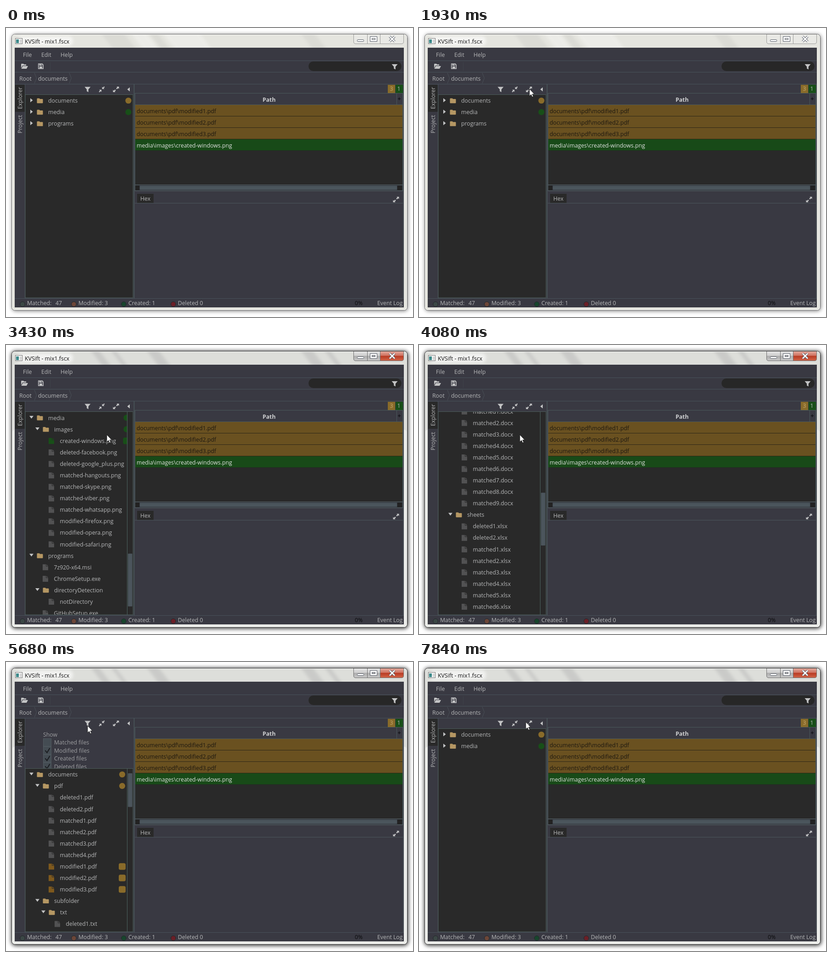
Write an HTML page that moves like this. It is 888 px wide and 631 px high and loops after 8000 ms.

```html
<!DOCTYPE html>
<html lang="en">
<head>
<meta charset="utf-8">
<title>KVSift</title>
<style>
html, body { margin: 0; width: 100%; height: 100%; overflow: hidden; background: #fff; }
svg { display: block; width: 888px; height: 631px; }
text { font: 12.3px "Open Sans", "Noto Sans", sans-serif; fill: #b6b7b8; white-space: pre; }
</style>
</head>
<body>
<svg id="stage" viewBox="0 0 888 631" xmlns="http://www.w3.org/2000/svg"></svg>
<script>
const LOOP = 8000, ROW = 25.08, TOP = 145.5, BOTTOM = 589, PANEL = 176, NOTCH = 128.15;
const C = {
  pane: '#393942', dark: '#292929', line: '#4a585b', thumb: '#4b555c', icon: '#c3c4c5',
  folder: '#b59763', file: '#525253', mod: '#896b2a', modFile: '#7e591d', new: '#184f18'
};

const R = (x, y, w, h, fill, more = '') =>
  `<rect x="${x}" y="${y}" width="${w}" height="${h}" fill="${fill}" ${more}/>`;
const T = (x, y, s, more = '') => `<text x="${x}" y="${y}" ${more}>${s}</text>`;
const P = (d, fill, more = '') => `<path d="${d}" fill="${fill}" ${more}/>`;
const L = (d, stroke = C.line, w = 1, more = '') => P(d, 'none', `stroke="${stroke}" stroke-width="${w}" ${more}`);
const dot = (x, y, r, fill, more = '') => `<circle cx="${x}" cy="${y}" r="${r}" fill="${fill}" ${more}/>`;
const at = (x, y, body, more = '') => `<g transform="translate(${x} ${y})${more}">${body}</g>`;

// Icons, centred on their own origin
const funnel = P('M-6.5-5.5H6.5L1.8 0V6L-1.8 4V0Z', C.icon);
const outward = P('M1.5-6H6.5V-1L4.8-2.7 2-.2.2-2 2.7-4.3ZM-1.5 6H-6.5V1L-4.8 2.7-2 .2-.2 2-2.7 4.3Z', C.icon);
const inward = P('M.7-.7V-5.7L2.4-4 5-6.5 6.5-5 4-2.4 5.7-.7ZM-.7.7V5.7L-2.4 4-5 6.5-6.5 5-4 2.4-5.7.7Z', C.icon);
const folder = P('M-6.5-4.2Q-6.5-5.5-5.2-5.5H-1.5Q-.5-5.5 0-4H5.3Q6.5-4 6.5-2.8V4Q6.5 5.2 5.3 5.2H-5.3Q-6.5 5.2-6.5 4Z', C.folder);
const fileIcon = fill => P('M-6-6.5H1V-1.8H6V6.5H-6ZM2-6.5L6-2.8H2Z', fill);

function streaks(list, fill, opacity) {
  return list.map(([x, w]) => P(`M${x} 8h${w}l32 42h${-w}Z`, fill, `opacity="${opacity}" filter="url(#soft)"`)).join('');
}

function frame(active) {
  const shadow = active
    ? 'drop-shadow(1px 1px 4px rgba(0,0,0,.6)) drop-shadow(0 1px 5px rgba(0,0,0,.45))'
    : 'drop-shadow(1px 1px 4px rgba(0,0,0,.5))';
  const glass = active
    ? streaks([[182, 18], [226, 10], [304, 26], [640, 26], [692, 12]], '#b4b4b4', .45)
    : streaks([[205, 50], [310, 18], [640, 30]], '#c9c9c4', .35) + streaks([[270, 34], [340, 80]], '#fff', .3);
  const x = 'M-5.5-5.5L5.5 5.5M5.5-5.5L-5.5 5.5';
  const edge = active ? '#6d6d6d' : '#9c9c9a';
  return `<g style="filter:${shadow}">${R(12.5, 13.5, 863, 603, active ? '#dddeda' : '#e5e5df', `rx="7" stroke="${active ? '#303030' : '#666'}"`)}</g>`
    + `<g clip-path="url(#title)">${glass}</g>`
    + (active ? R(14, 185, 860, 430, '#fff', 'rx="5" opacity=".4"') : '')
    + R(13.5, 14.5, 861, 601, 'none', 'rx="6" stroke="#fff" stroke-opacity=".75"')
    + R(24, 18, 122, 21, '#fff', 'rx="9" opacity=".6" filter="url(#soft)"')
    + P('M758.5 14V30Q758.5 34.5 763 34.5H863Q867.5 34.5 867.5 30V14Z', active ? 'url(#btn)' : '#e9e9e5')
    + (active ? P('M817 14V34.5H863Q867.5 34.5 867.5 30V14Z', 'url(#close)') : '')
    + L('M758.5 14V30Q758.5 34.5 763 34.5H863Q867.5 34.5 867.5 30V14M788.5 14V34M816.5 14V34', edge)
    + R(766.5, 25.5, 14, 4, '#fff', 'stroke="#555b66" rx="1"')
    + P('M794.5 18.5H809.5V29.5H794.5ZM798.5 22.5V25.5H805.5V22.5Z', '#fff', 'stroke="#555b66" fill-rule="evenodd"')
    + at(842.5, 24, L(x, '#555b66', 4.6) + L(x, '#fff', 2.6))
    + R(20.5, 22.5, 15, 12, '#f4f4f4', 'stroke="#777"') + R(22, 25, 6, 8, '#3d8a8a') + R(30, 25, 4, 8, '#d6d6d6')
    + T(41, 33.5, 'KVSift - mix1.fscx', 'style="fill:#111"');
}

function chrome() {
  const paths = ['documents\\pdf\\modified1.pdf', 'documents\\pdf\\modified2.pdf',
    'documents\\pdf\\modified3.pdf', 'media\\images\\created-windows.png'];
  const status = [[36, '#3b4745', 46, 'Matched:'], [148, '#6c4638', 158, 'Modified: 3'],
    [257, '#18452d', 267, 'Created: 1'], [365, '#6b1f27', 375, 'Deleted 0']];
  let s = R(19, 43, 849, 567, C.pane)
    + L('M19 71.5H868M19 96.5H868M19 122.5H868M41.5 123V590M19 590.5H868', '#48525a')
    + T(37, 63, 'File') + T(77, 63, 'Edit') + T(119, 63, 'Help')
    + P('M33 79Q33 78 34 78H38L39.5 79.5H44V82H36L33 87.5ZM36.7 83H48L44.8 89H33.4Z', C.icon)
    + P('M70 77.5H79.5L82 80V89.5H70ZM71.5 79V88H80.5V80.6L79 79.1V82.5H72.8V79ZM76 79.2V81.4H77.6V79.2ZM73 84H79V88H73Z', C.icon, 'fill-rule="evenodd"')
    + L('M96.5 75V93', '#3f4249')
    + R(660, 73, 203, 21, '#272727', 'rx="10.5"') + at(848, 84.5, funnel)
    + T(29, 115, 'Root') + T(70, 115, 'documents')
    + L('M62 98L66.5 109.5 62 121M138 98L142.5 109.5 138 121', '#4a5057')
    // side tabs
    + R(20, 124, 21, 59, C.dark)
    + T(0, 0, 'Explorer', 'transform="translate(35 153) rotate(-90)" text-anchor="middle"')
    + T(0, 0, 'Project', 'transform="translate(35 210) rotate(-90)" text-anchor="middle"')
    // tree tools
    + at(178, 134, funnel) + at(209, 134, inward) + at(240, 134, outward)
    + P('M264.5 134L270 129.5V138.5Z', C.icon) + L('M279.5 123V590', '#4b5a5c', 1.5)
    // result table
    + R(833, 124, 16, 18, C.mod) + T(841, 137, '3', 'text-anchor="middle" style="fill:#c4a76c"')
    + R(850, 124, 16, 18, C.new) + T(857, 137, '1', 'text-anchor="middle"')
    + R(281, 142, 585, 214, C.dark) + R(282, 143, 583, 24, C.pane)
    + L('M281 142.5H866M281 167.5H866M281.5 142V355M865.5 142V355M852.5 143V167')
    + T(574, 160.5, 'Path', 'text-anchor="middle" style="font-weight:700;fill:#cfd0d1"')
    + L('M855 154.5H861M858 151.5V157.5', '#15161a', 1.5);
  paths.forEach((p, i) => {
    const y = 168 + i * 25;
    s += R(282, y, 583, 24, i < 3 ? '#6a5120' : '#184a18') + R(282, y + 24, 583, 1, i < 3 ? '#2d2717' : '#202c20')
      + T(285, y + 17.5, p, `style="fill:${i < 3 ? '#1c1710' : '#e0e2e0'}"`);
  });
  s += L('M281 342.5H866M281 355.5H866', '#59666a') + R(282, 343, 583, 12, '#30333a')
    + R(282, 344, 9, 10, '#222') + R(854, 344, 10, 10, '#222') + R(292, 344.5, 561, 9, C.thumb, 'rx="1"')
    + R(281, 356, 585, 234, C.pane) + R(286, 362, 36, 20, C.dark) + T(293, 377, 'Hex')
    + at(851, 374.5, outward) + L('M281 382.5H866M866.5 123V590', '#4b555b');
  for (const [x, fill, tx, label] of status)
    s += dot(x, 603, 5.3, fill, 'stroke="#23272a"') + T(tx, 605, label);
  return s + T(108, 605, '47') + T(761, 605, '0%', 'style="fill:#0c0c0e"') + T(810, 605, 'Event Log');
}

// Tree entries: [depth, name, isFolder, state]
const dir = (d, name, state) => [d, name, true, state];
const files = (d, names, state) => names.split(' ').map(n => [d, n, false, state]);
const series = (d, kind, ext, n, state) =>
  Array.from({ length: n }, (_, i) => [d, kind + (i + 1) + ext, false, state]);
const group = (d, ext, n) => [...series(d, 'deleted', ext, 2), ...series(d, 'matched', ext, n)];

const roots = [dir(0, 'documents', 'mod'), dir(0, 'media', 'new'), dir(0, 'programs')];
const full = [
  roots[0], dir(1, 'pdf', 'mod'), ...group(2, '.pdf', 4), ...series(2, 'modified', '.pdf', 3, 'mod'),
  dir(1, 'subfolder'), dir(2, 'txt'), ...group(3, '.txt', 7),
  dir(1, 'word'), ...group(2, '.docx', 9), dir(1, 'sheets'), ...group(2, '.xlsx', 9),
  roots[1], dir(1, 'images', 'new'), ...files(2, 'created-windows.png', 'new'),
  ...files(2, 'deleted-facebook.png deleted-google_plus.png matched-hangouts.png matched-skype.png '
    + 'matched-viber.png matched-whatsapp.png modified-firefox.png modified-opera.png modified-safari.png'),
  roots[2], ...files(1, '7z920-x64.msi ChromeSetup.exe'), dir(1, 'directoryDetection'),
  ...files(2, 'notDirectory'), ...files(1, 'GitHubSetup.exe setup.msi')
];

function tree(items, open, scroll, panel) {
  const top = TOP + panel, view = BOTTOM - top, total = items.length * ROW;
  const markX = open ? 253.5 + (scroll > 811 ? 9.5 : 0) : 267;
  let rows = '';
  items.forEach(([d, name, isDir, state], i) => {
    const y = top + 13 + i * ROW - scroll, x = 13 * d;
    if (y < top - 14 || y > BOTTOM + 14) return;
    if (isDir) {
      rows += P(open ? `M${51 + x} ${y - 4}h9l-4.5 6Z` : `M53 ${y - 5.3}v9l5.5-4.5Z`, C.icon)
        + at(74 + x, y + .5, folder) + T(92 + x, y + 4.8, name);
      if (state) rows += dot(markX, y, 6.6, C[state]);
    } else {
      rows += at(73 + x, y + .5, fileIcon(state === 'mod' ? C.modFile : state ? C.new : C.file))
        + T(91.5 + x, y + 4.8, name);
      if (state) rows += R(markX - 7.5, y - 7, 15, 14.5, C[state], 'rx="3.5"');
    }
  });
  let s = R(42, top, 236, view, C.dark) + `<g clip-path="url(#${open ? 'rows' : 'pane'})">${rows}</g>`;
  if (open) {
    const track = view - 20, thumb = track * view / total;
    const y = top + 10.5 + (track - thumb) * scroll / (total - view);
    s += R(264, top, 13, view, C.dark) + L(`M264.5 ${top}V589`, '#4d635f') + R(266, y, 9.5, thumb, C.thumb, 'rx="1"');
  }
  return s + R(42, Math.round(top) - .5, 235, 589 - Math.round(top) + .5, 'none', 'stroke="#4d5c5b"');
}

// The form is squeezed while there is too little room for it
function form(h, busy) {
  if (h <= 0) return '';
  const room = Math.max(0, (h - 125) / (PANEL - 125)), pitch = 17.35 + 8.6 * room;
  const y0 = 158.3 + 2 * room, by = 240 + 51 * room;
  let s = T(81, y0 + 4.8, 'Show');
  ['Matched', 'Modified', 'Created', 'Deleted'].forEach((name, i) => {
    const y = y0 + pitch * (i + 1);
    s += R(81.5, y - 8.5, 17, 17, '#485158', 'stroke="#59656a"') + T(105, y + 4.8, name + ' files');
    if (i) s += L(`M85.5 ${y}l4 5 6-10`, '#111416', 2);
  });
  const label = 'text-anchor="middle"';
  s += R(109.5, by, 55, 23, '#4c575e', 'rx="2"') + T(137, by + 16, 'Cancel', label)
    + R(191.5, by, 49, 23, '#4c575e', 'rx="2"') + T(216, by + 16, 'Apply', label);
  return `<g clip-path="url(#form)" opacity="${busy ? .42 : Math.min(1, .3 + h / PANEL)}">${s}</g>`;
}

// Pointer moves: start, end, then the four points of a cubic curve
const moves = [
  [1030, 1900, 97, 625, 130, 480, 325, 270, 241, 133],
  [2420, 2580, 241, 133, 236, 155, 226, 180, 220, 196],
  [4920, 5420, 220, 196, 210, 175, 190, 150, 178, 139],
  [5900, 6630, 178, 139, 112, 200, 160, 290, 225, 303],
  [6900, 7530, 225, 303, 190, 220, 80, 110, 40, 83],
  [7590, 7840, 40, 83, 100, 120, 290, 175, 233, 131]
];
const wheelDown = [2600, 2640, 2680, 2720, 3050, 3110, 3310, 3370, 3430];
const wheelUp = [3760, 3820, 3880, 4080, 4140, 4200, 4400, 4460, 4660];

function pointer(t) {
  const m = moves.filter(v => t >= v[0]).pop();
  if (!m) return null;
  const p = Math.min(1, (t - m[0]) / (m[1] - m[0])), u = p * p * (3 - 2 * p), w = 1 - u;
  const curve = i => w * w * w * m[i] + 3 * w * w * u * m[i + 2] + 3 * w * u * u * m[i + 4] + u * u * u * m[i + 6];
  return [curve(2), curve(3)];
}

function panelHeight(t) {
  if (t < 5620) return 0;
  if (t < 5740) return t < 5680 ? 30 : 87;
  return PANEL * Math.max(0, Math.min(1, (6999 - t) / 238));
}

const stage = document.getElementById('stage');
const grad = (id, ...stops) => `<linearGradient id="${id}" x2="0" y2="1">${stops.map(([o, c]) =>
  `<stop offset="${o}" stop-color="${c}"/>`).join('')}</linearGradient>`;
const clip = (id, x, y, w, h) => `<clipPath id="${id}">${R(x, y, w, h, '#000')}</clipPath>`;
stage.innerHTML = `<defs>
  <filter id="soft" x="-30%" y="-60%" width="160%" height="220%"><feGaussianBlur stdDeviation="3"/></filter>
  ${grad('btn', [0, '#e4e4e4'], [.45, '#cfcfcf'], [.5, '#acacac'], [1, '#c9c9c9'])}
  ${grad('close', [0, '#e3a99c'], [.45, '#cf7160'], [.5, '#b93a22'], [1, '#d0664a'])}
  ${clip('title', 14, 15, 860, 28)}
  <clipPath id="rows"><rect class="cut" x="42" width="222.5"/></clipPath>
  <clipPath id="pane"><rect class="cut" x="42" width="236"/></clipPath>
  <clipPath id="form"><rect id="formCut" x="42" y="145" width="236"/></clipPath></defs>
  <g id="idle">${frame(false)}</g><g id="active">${frame(true)}</g>${chrome()}
  <g id="left"></g>
  <g id="pointer">${P('M0 0V15.6L3.6 12.2 6 17.6 8.4 16.5 6 11.3H10.6Z', '#fff', 'stroke="#111" stroke-width=".8"')}</g>`;
const $ = id => document.getElementById(id);
const cuts = stage.querySelectorAll('.cut');
let lastKey = '';

function draw(t) {
  const active = t >= 1960, open = t >= 2160 && t < 6730, h = panelHeight(t);
  $('idle').style.display = active ? 'none' : '';
  $('active').style.display = active ? '' : 'none';

  const past = list => list.filter(v => t >= v).length;
  const scroll = NOTCH * (past(wheelDown) - past(wheelUp));
  const busy = t >= 6730, key = [open, busy, h, scroll].join();
  if (key !== lastKey) {
    lastKey = key;
    cuts.forEach(c => {
      c.setAttribute('y', TOP + h);
      c.setAttribute('height', BOTTOM - TOP - h);
    });
    $('formCut').setAttribute('height', h);
    const items = open ? full : busy ? roots.slice(0, 2) : roots;
    $('left').innerHTML = form(h, busy) + tree(items, open, scroll, h);
  }

  const pos = pointer(t);
  $('pointer').style.display = pos ? '' : 'none';
  if (pos) $('pointer').setAttribute('transform', `translate(${pos[0]} ${pos[1]})`);
}

function tick() {
  draw(performance.now() % LOOP);
  requestAnimationFrame(tick);
}
tick();
</script>
</body>
</html>
```
